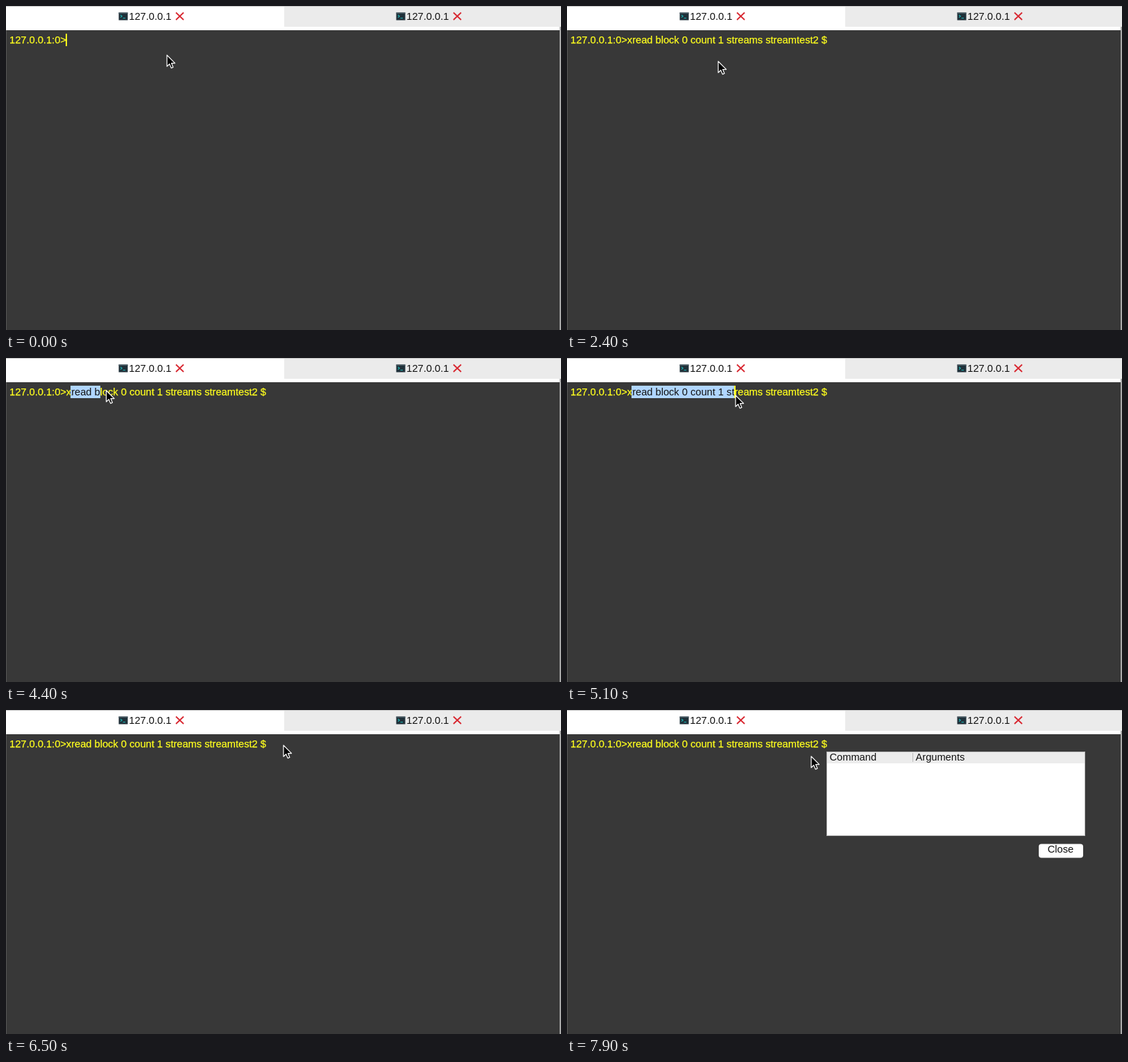
Write an HTML page that moves like this. It is 800 px wide and 468 px high and loops after 8000 ms.

```html
<!DOCTYPE html>
<html lang="en">
<head>
<meta charset="utf-8">
<title>Console</title>
<style>
  html, body { margin: 0; width: 800px; height: 468px; overflow: hidden; background: #383838; }
  svg { display: block; }
  text { font: 14.65px "Liberation Sans", Arial, sans-serif; fill: #111; }
  #line, #caret { fill: #ffff1e; }
  #line { stroke: #ffff1e; stroke-width: 0.25; }
</style>
</head>
<body>
<svg width="800" height="468" viewBox="0 0 800 468">
  <defs>
    <g id="tab">
      <rect x="162.5" y="9.5" width="13" height="11" fill="#20313a"/>
      <rect x="162.5" y="9.5" width="13" height="1.5" fill="#4b5d66"/>
      <path d="M165 13l2.2 1.8-2.2 1.8M168.5 17.5h3.5" fill="none" stroke="#1fb5b5" stroke-width="1.1"/>
      <text x="177.3" y="20">127.0.0.1</text>
      <path d="M245 9.5l11 10.5M256 9.5l-11 10.5" stroke="#d8262f" stroke-width="1.8"/>
    </g>
    <clipPath id="clip"><rect id="clipBox" y="40" width="0" height="18"/></clipPath>
  </defs>

  <rect width="800" height="35" fill="#fff"/>
  <rect x="401" width="399" height="30" fill="#ebebeb"/>
  <rect width="800" height="1" fill="#c6c6c6"/>
  <use href="#tab"/>
  <use href="#tab" x="400"/>

  <rect y="35" width="800" height="433" fill="#383838"/>
  <rect y="35" width="1" height="433" fill="#555"/>
  <rect x="798" y="30" width="2" height="438" fill="#a9a9a9"/>

  <text id="line" x="5" y="54"></text>
  <rect id="mark" y="40" width="0" height="18" fill="#b0d6ff"/>
  <g clip-path="url(#clip)"><text id="picked" x="5" y="54"></text></g>
  <rect id="caret" y="40" width="2" height="18"/>

  <g id="popup">
    <rect x="374" y="60" width="373" height="122" fill="#fff"/>
    <rect x="374" y="60" width="373" height="17" fill="#ececec"/>
    <path d="M498.5 62v13" stroke="#bdbdbd"/>
    <rect x="374.5" y="60.5" width="372" height="121" fill="none" stroke="#b4b4b4"/>
    <text x="378.5" y="73">Command</text>
    <text x="502.5" y="73">Arguments</text>
    <rect x="680" y="193.5" width="64" height="20" rx="4" fill="#fff"/>
    <text x="692.8" y="206">Close</text>
  </g>

  <path id="mouse" d="M0 0V16.2L3.7 12.7 6.2 18.6 8.9 17.4 6.5 11.6H11.6Z"
        fill="#000" stroke="#fff" stroke-width="1.2" stroke-linejoin="round"/>
</svg>

<script>
const LOOP = 8000, STEP = 100, LEFT = 5;
const PROMPT = "127.0.0.1:0>";
const COMMAND = "xread block 0 count 1 streams streamtest2 $";
const PASTE = 1800, PRESS = 3900, CLEAR = 6300, POPUP = 7000;

// pointer path: time, x, y
const path = [
  [0, 232, 71], [1000, 232, 71], [1200, 218, 80], [2600, 218, 80],
  [3200, 161, 48], [3600, 161, 48], [3900, 94, 48], [4400, 144.5, 47],
  [5000, 243, 54], [5200, 243, 54], [6100, 400, 51], [6800, 400, 51],
  [7600, 354, 66], [7900, 352, 67]
];
// each blink lasts half a second
const blinks = [-300, 700, 1800, 2800, 3800, 4800, 5800, 6800];

const $ = id => document.getElementById(id);
const [line, picked, mark, clipBox, caret, popup, mouse] =
  ["line", "picked", "mark", "clipBox", "caret", "popup", "mouse"].map($);
const show = (el, on) => el.setAttribute("visibility", on ? "visible" : "hidden");

const full = PROMPT + COMMAND;
line.textContent = picked.textContent = full;
const edges = [...full].map((_, i) => LEFT + line.getSubStringLength(0, i + 1));
const start = edges[PROMPT.length - 1];
const anchor = edges[PROMPT.length];
const end = edges[edges.length - 1];

function pointer(t) {
  const i = path.findIndex(k => k[0] > t);
  if (i < 0) return path[path.length - 1].slice(1);
  const [t0, x0, y0] = path[i - 1], [t1, x1, y1] = path[i];
  const p = (t - t0) / (t1 - t0);
  return [x0 + (x1 - x0) * p, y0 + (y1 - y0) * p];
}

const snap = x => edges.reduce((a, b) => Math.abs(b - x) < Math.abs(a - x) ? b : a);

function draw(t) {
  const pasted = t >= PASTE;
  const dragging = t >= PRESS && t < CLEAR;
  // selection trails the pointer by one step
  const head = dragging ? Math.max(anchor, snap(pointer(t - STEP)[0])) : anchor;
  const text = pasted ? full : PROMPT;
  if (line.textContent !== text) line.textContent = text;

  const from = Math.floor(anchor) - 1, to = Math.round(head);
  for (const box of [mark, clipBox]) {
    box.setAttribute("x", from);
    box.setAttribute("width", head > anchor ? to - from : 0);
  }
  caret.setAttribute("x", dragging ? to : Math.round(pasted ? end : start) - 1);
  show(caret, t < POPUP && blinks.some(b => t >= b && t < b + 500));
  show(popup, t >= POPUP);

  const [x, y] = pointer(t);
  mouse.setAttribute("transform", `translate(${x.toFixed(1)} ${y.toFixed(1)})`);
}

function tick() {
  draw(Math.floor(performance.now() % LOOP / STEP) * STEP);
  requestAnimationFrame(tick);
}
tick();
</script>
</body>
</html>
```
